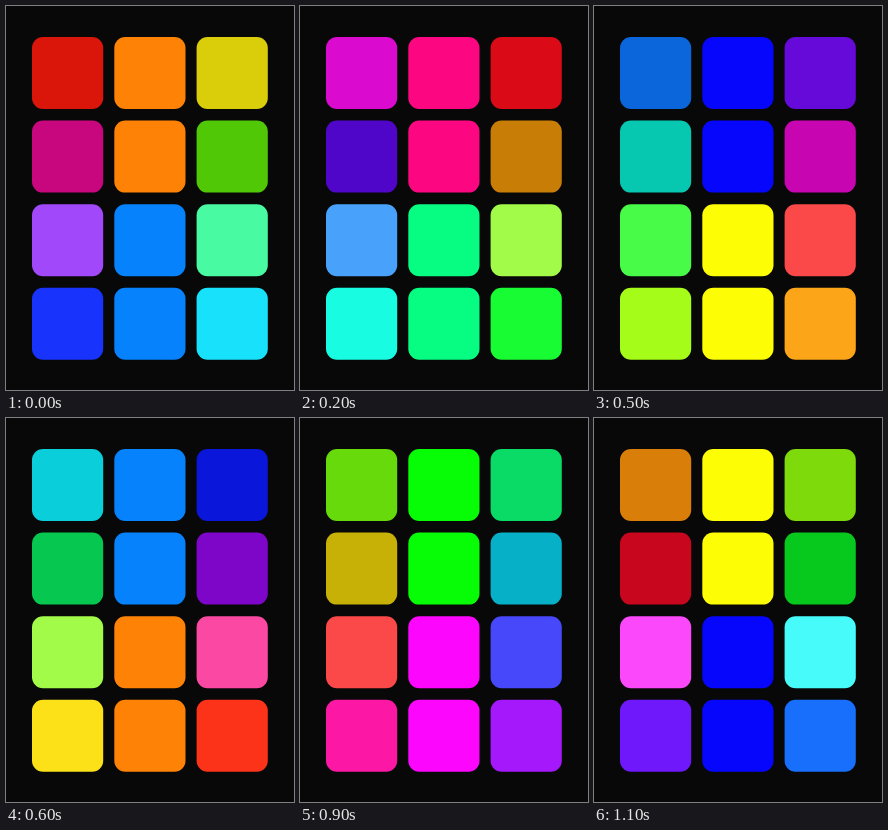
An HTML page with a canvas that plays this animation: 288 px wide and 384 px high, repeating every 1200 ms.

```html
<!DOCTYPE html>
<html lang="en">
<head>
<meta charset="utf-8">
<title>Hue grid</title>
<style>
html, body { margin: 0; width: 100%; height: 100%; overflow: hidden; background: #080808; }
canvas { display: block; }
</style>
</head>
<body>
<canvas id="stage" width="288" height="384"></canvas>
<script>
const ctx = document.getElementById('stage').getContext('2d');
const LOOP = 1200, STEP = 100, TURN = 30;
const LEFT = 26, TOP = 31, PITCH_X = 82.3, PITCH_Y = 83.6;
const CELL_W = 71.2, CELL_H = 72, RADIUS = 11;

// Middle hue, hue offset of the side cells, channel range of the side cells
const rows = [
  { hue: 30, side: 26.5, low: 10, high: 218 },
  { hue: 30, side: 67, low: 6, high: 200 },
  { hue: 210, side: -60, low: 72, high: 251 },
  { hue: 210, side: -23, low: 24, high: 252 }
];
const MID_LOW = 6, MID_HIGH = 253;

function color(hue, low, high) {
  const channel = n => {
    const k = (((n + hue / 60) % 6) + 6) % 6;
    const amount = 1 - Math.max(0, Math.min(k, 4 - k, 1));
    return Math.round(low + (high - low) * amount);
  };
  return `rgb(${channel(5)}, ${channel(3)}, ${channel(1)})`;
}

function draw(time) {
  const shift = Math.floor((time % LOOP) / STEP) * TURN;
  ctx.fillStyle = '#080808';
  ctx.fillRect(0, 0, 288, 384);
  rows.forEach((row, r) => {
    for (let c = 0; c < 3; c++) {
      const hue = row.hue + (c - 1) * row.side - shift;
      ctx.fillStyle = c === 1
        ? color(hue, MID_LOW, MID_HIGH)
        : color(hue, row.low, row.high);
      ctx.beginPath();
      ctx.roundRect(LEFT + c * PITCH_X, TOP + r * PITCH_Y, CELL_W, CELL_H, RADIUS);
      ctx.fill();
    }
  });
}

const start = performance.now();
function tick() {
  draw(performance.now() - start);
  requestAnimationFrame(tick);
}
tick();
</script>
</body>
</html>
```
